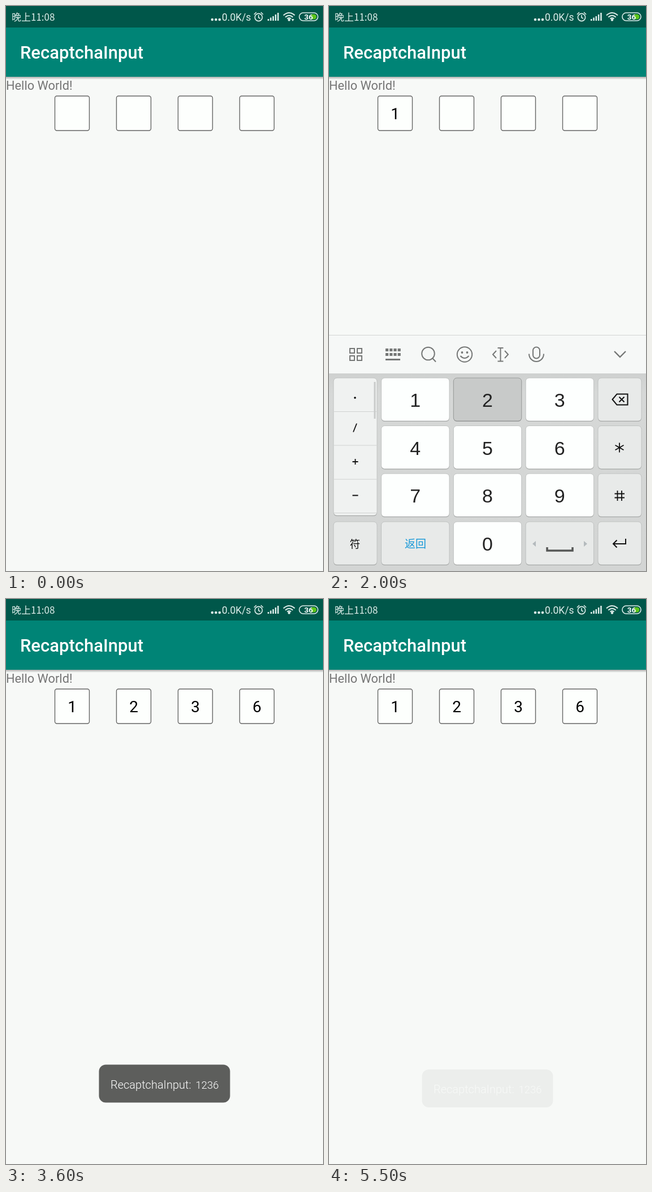
Recreate the animation shown at these times as an HTML page. Size 561 px wide and 998 px high, loop 5.6 s.

```html
<!DOCTYPE html>
<html lang="zh">
<head>
<meta charset="utf-8">
<title>RecaptchaInput</title>
<style>
html, body { margin: 0; width: 100%; height: 100%; overflow: hidden; background: #f7f9f7; }
svg { display: block; width: 100%; height: 100%; }
text { font-family: Roboto, sans-serif; }
.cjk { font-family: "Noto Sans CJK SC", "Noto Sans CJK", sans-serif; }
.num { font: 34px "Liberation Sans", sans-serif; fill: #222; }
.mid { text-anchor: middle; }
.line { fill: none; stroke-width: 2; }
</style>
</head>
<body>
<svg viewBox="0 0 561 998">
  <defs>
    <linearGradient id="shade" x2="0" y2="1">
      <stop stop-color="#000" stop-opacity=".3"/>
      <stop offset="1" stop-color="#000" stop-opacity="0"/>
    </linearGradient>
    <linearGradient id="tray" x2="0" y2="1">
      <stop stop-color="#cfd1d0"/>
      <stop offset=".1" stop-color="#d6d8d7"/>
      <stop offset="1" stop-color="#d3d5d4"/>
    </linearGradient>
  </defs>
  <rect width="561" height="998" fill="#f7f9f7"/>
  <rect y="125" width="561" height="5" fill="url(#shade)"/>
  <rect y="38" width="561" height="87" fill="#008476"/>
  <rect width="561" height="38" fill="#00574a"/>

  <g fill="#e0eeeb">
    <text class="cjk" x="10" y="26" font-size="17">晚上11:08</text>
    <circle cx="365" cy="24" r="2.3"/><circle cx="371.5" cy="24" r="2.3"/><circle cx="378" cy="24" r="2.3"/>
    <text x="382" y="26" font-size="17.5">0.0K/s</text>
    <path d="M463 23h2.5v3h-2.5zM467.3 20.5h2.5V26h-2.5zM471.6 18h2.5v8h-2.5zM475.9 15h2.5v11h-2.5zM480.2 12h2.5v14h-2.5z"/>
    <circle cx="501" cy="24.5" r="2.2"/>
    <path id="arrow" d="M505 23h5l-2.5 4z"/>
  </g>
  <g class="line" stroke="#e0eeeb" stroke-width="1.6">
    <circle cx="447" cy="20" r="6.6" stroke-width="1.6"/>
    <path d="M447 16v4.5l3 1.5M439 15l4-4M455 15l-4-4" stroke-width="1.6"/>
    <path d="M491 16.5q10-9 20 0M494.3 19.8q6.7-6 13.4 0M497.5 22.6q3.5-3 7 0"/>
    <rect x="519" y="12" width="33" height="14" rx="7" stroke-width="1.6"/>
  </g>
  <path d="M540 14.5h5a4.5 4.5 0 0 1 0 9h-5z" fill="#5cc41a"/>
  <text class="mid" x="535.5" y="24" font-size="13.5" font-weight="700" fill="#fff">36</text>

  <text x="25" y="93" font-size="31" font-weight="500" fill="#fff">RecaptchaInput</text>
  <text x="0" y="148" font-size="21.8" fill="#757575">Hello World!</text>
  <g id="boxes"></g>

  <g id="board">
    <rect y="581" width="561" height="69" fill="#f6f8f7"/>
    <path d="M0 581.5h561" stroke="#d3d5d4"/>
    <rect y="649" width="561" height="349" fill="url(#tray)"/>
    <g class="line" stroke="#757776">
      <path d="M37 605h8v8h-8zM50 605h8v8h-8zM37 618h8v8h-8zM50 618h8v8h-8z"/>
      <path d="M100 607.5h27M100 615.5h27" stroke-width="5" stroke-dasharray="5.2 2"/>
      <path d="M100 624.5h26" stroke-width="3"/>
      <circle cx="175.5" cy="614" r="11.3"/><path d="M183 622l6 6.5"/>
      <circle cx="240" cy="615.5" r="13.2"/><path d="M232.5 618q7.5 8 15 0"/>
      <path d="M296 609l-6 6.5 6 6.5M311 609l6 6.5-6 6.5M298.5 604h10M298.5 627.5h10M303.5 604v23.5"/>
      <rect x="361" y="602.5" width="12" height="20" rx="6"/>
      <path d="M354 614.5a13 13.5 0 0 0 26 0"/>
      <path d="M505 610l10 10 10-10" stroke-width="2.4"/>
    </g>
    <g fill="#757776"><circle cx="235.5" cy="612" r="1.9"/><circle cx="244.5" cy="612" r="1.9"/></g>

    <g id="keys"></g>

    <path d="M8.5 716.5h76M8.5 776h76M8.5 836h76M8.5 895.5h76" stroke="#d0d2d1"/>
    <path d="M81 664v65" stroke="#c9cbca" stroke-width="3"/>
    <g class="line" stroke="#111">
      <path d="M49 737.5l-6 15M41.5 805h10M46.5 800v10M41.5 864.5h10" stroke-width="1.8"/>
      <path d="M501.500 695l8-9.500h19v19h-19zM513.500 690.500l9 9M522.500 690.500l-9 9"/>
      <path d="M514 771.500v17M506.500 775.800l15 8.500M506.500 784.300l15-8.500" stroke-width="1.8"/>
      <path d="M510.500 856v18M518 856v18M505.500 861.500h17.500M505.500 868.500h17.500" stroke-width="1.8"/>
      <path d="M525 941v9h-22M509.500 943.500l-6.500 6.500 6.500 6.500"/>
    </g>
    <circle cx="46" cy="692" r="1.8"/>
    <path d="M386 956v6h45v-6" class="line" stroke="#555756" style="stroke-width:3.5"/>
    <path d="M366 945v10l-6-5zM451 945v10l6-5z" fill="#b4babd"/>
    <text class="cjk mid" x="46" y="957" font-size="18.500" fill="#111">符</text>
    <text class="cjk mid" x="153" y="957" font-size="19" fill="#1598d8">返回</text>
  </g>

  <g id="toast">
    <rect x="164.500" y="831" width="232" height="67" rx="12" fill="#5d5e5c"/>
    <g font-size="20" fill="#fff">
      <text x="185" y="873" font-weight="300">RecaptchaInput:</text>
      <text class="mid" x="356" y="873" font-size="18.500" font-weight="300">1236</text>
    </g>
  </g>
</svg>
<script>
const $ = id => document.getElementById(id);
const clamp = v => Math.max(0, Math.min(1, v));
const LOOP = 5600, STEP = 100, BOARD = 417;
// Each key is held for one step, then its digit appears.
const presses = [[1600, 1], [2000, 2], [2600, 3], [3300, 6]];

function add(parent, tag, attrs, text = '') {
  const el = document.createElementNS('http://www.w3.org/2000/svg', tag);
  for (const name in attrs) el.setAttribute(name, attrs[name]);
  el.textContent = text;
  parent.append(el);
  return el;
}

const digits = presses.map(([, digit], i) => {
  const x = 86.5 + i * 109;
  add($('boxes'), 'rect', { x, y: 159, width: 61, height: 61, rx: 3.5, fill: '#fdfffd', stroke: '#666', 'stroke-width': 1.4 });
  return add($('boxes'), 'text', { class: 'mid', x: x + 30.5, y: 200, 'font-size': 28 }, digit);
});

function key(x, y, width, height, fill) {
  const box = { x, y, width, height, rx: 6 };
  add($('keys'), 'rect', { ...box, y: y + 1, fill: '#9b9d9c' });
  return add($('keys'), 'rect', { ...box, fill, stroke: '#b9bbba', 'stroke-width': .8 });
}

const rows = [657, 741.5, 826, 911], gray = '#e8eae9', keyRects = {};
key(8, 657, 77, 243, '#f0f2f1');
key(8, 911, 77, 76, gray);
rows.forEach((y, row) => {
  for (let col = 0; col < 3; col++) {
    const digit = row < 3 ? row * 3 + col + 1 : col === 1 ? 0 : null;
    const x = 92.5 + col * 127.8;
    const rect = key(x, y, 120.5, 76, digit === null ? gray : '#fdfffe');
    if (digit === null) continue;
    keyRects[digit] = rect;
    add($('keys'), 'text', { class: 'num mid', x: x + 60.2, y: y + 51 }, digit);
  }
  key(476, y, 77, 76, gray);
});

function draw(now) {
  const t = Math.floor(now % LOOP / STEP) * STEP;

  presses.forEach(([start, digit], i) => {
    const held = t === start;
    keyRects[digit].setAttribute('fill', held ? '#c8cac9' : '#fdfffe');
    keyRects[digit].setAttribute('stroke', held ? '#8c8e8d' : '#b9bbba');
    digits[i].style.visibility = t > start ? 'visible' : 'hidden';
  });

  const rise = clamp((t - 700) / 400), fall = clamp((t - 3300) / 300);
  const drop = BOARD * Math.max((1 - rise) ** 2, fall ** 2);
  $('board').setAttribute('transform', `translate(0 ${drop})`);
  $('board').style.visibility = drop < BOARD ? 'visible' : 'hidden';

  // The toast sits above the keyboard and settles as it closes.
  const lift = BOARD * (1 - clamp((t - 3400) / 275)) ** 3;
  $('toast').setAttribute('transform', `translate(0 ${-lift})`);
  $('toast').setAttribute('opacity', Math.min(clamp((t - 3300) / 250), clamp((5520 - t) / 310)));

  $('arrow').style.visibility = t < 800 || (t >= 4100 && t < 5100) ? 'visible' : 'hidden';
}

let begin;
function tick(now) {
  begin ??= now;
  draw(now - begin);
  requestAnimationFrame(tick);
}
draw(0);
requestAnimationFrame(tick);
</script>
</body>
</html>
```
